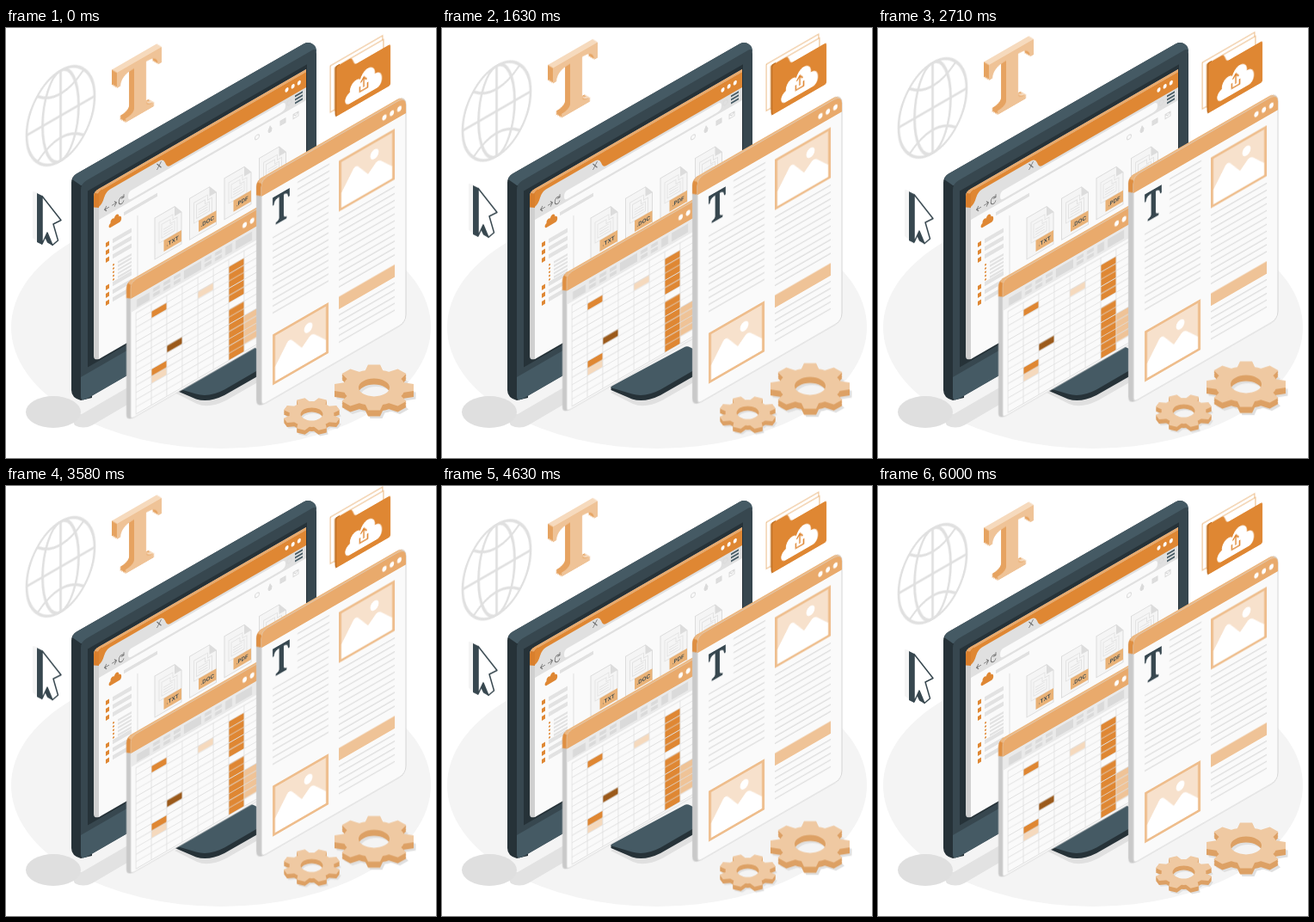
These frames come from a looping animation (500x500 px, 6040 ms). An HTML page without scripts:

```html
<!DOCTYPE html>
<html lang="en">
<head>
<meta charset="utf-8">
<title>Digital documents</title>
<style>
html, body { margin: 0; width: 100%; height: 100%; overflow: hidden; background: #fff; }
svg { display: block; width: 100vw; height: 100vh; }
.slow, .mid, .fast { animation: slow 6.04s linear infinite; }
.mid { animation-name: mid; }
.fast { animation-name: fast; }
@keyframes slow {
  0%, 99.34%, 100% { transform: translateY(0); }
  49.67% { transform: translateY(-10px); }
}
@keyframes mid {
  0%, 49.67%, 99.34%, 100% { transform: translateY(0); }
  24.83%, 74.5% { transform: translateY(-10px); }
}
@keyframes fast {
  0%, 24.83%, 49.67%, 74.5%, 99.34%, 100% { transform: translateY(0); }
  12.42%, 37.25%, 62.09%, 86.92% { transform: translateY(-10px); }
}
.line { fill: none; stroke: #e0e0e0; }
.text { fill: none; stroke: #dedede; stroke-width: 65; stroke-dasharray: 1.5 6.45; }
.tag { font: 600 6.2px Inter, Roboto, sans-serif; fill: #37474f; }
.main { fill: #df8733; }
.soft { fill: #e9aa6c; }
.pale { fill: #efc397; }
.white { fill: #fff; }
</style>
</head>
<body>
<svg viewBox="0 0 500 500" xmlns="http://www.w3.org/2000/svg">
<defs>
  <path id="tee" d="M0 0H52V18H48C47 9 43 6.500 34 6.500V53C34 57 37 59 43 59V64H10V59C16 59 20 57 20 53V6.500C10 6.500 5 9 4 18H0Z"/>
  <path id="tooth" d="M-10.500 -33L-7 -46H7L10.500 -33Z"/>
  <g id="four"><use href="#tooth"/><use href="#tooth" transform="rotate(90)"/><use href="#tooth" transform="rotate(180)"/><use href="#tooth" transform="rotate(270)"/></g>
  <g id="wheel">
    <path fill-rule="evenodd" d="M-36 0A36 36 0 0 1 36 0A36 36 0 0 1 -36 0M-18 0A18 18 0 0 0 18 0A18 18 0 0 0 -18 0"/>
    <use href="#four"/><use href="#four" transform="rotate(45)"/>
  </g>
  <g id="flat" transform="scale(1 .577)"><use href="#wheel"/></g>
  <g id="turned" transform="scale(1 .577) rotate(22.500)"><use href="#wheel"/></g>
  <g id="page">
    <path d="M0 0H23L31 11V48H0Z" fill="#f5f5f5" stroke="#dcdcdc"/>
    <path d="M23 0V11H31Z" fill="#dcdcdc"/>
    <path class="line" stroke-width=".8" d="M5 8H21V14H26V32H5ZM8 12H18V17H23V28H8ZM10 19H21M10 22H21M10 25H21"/>
  </g>
  <path id="tagbox" d="M10.500 32H31V45H10.500Z" fill="#e9b277"/>
  <g id="photo">
    <path d="M0 0H65V59H0Z" fill="#eebd8c"/>
    <path d="M3 3H62V56H3Z" fill="#f7e1cc"/>
    <path class="white" d="M3 56V39L17 19Q20 16 23 20L34 35L43 27Q46 25 49 28L62 42V56Z"/>
    <ellipse class="white" cx="41.500" cy="16" rx="4.800" ry="5.600"/>
  </g>
  <path id="cloud" d="M-16 15C-23 15-24 4-16 2C-17-7-8-11-4-6C0-19 14-15 13-3C23-4 24 15 15 15Z"/>
  <g id="dots" class="white"><ellipse rx="2.500" ry="3.100"/><ellipse cx="8.700" rx="2.500" ry="3.100"/><ellipse cx="17.400" rx="2.500" ry="3.100"/></g>
</defs>

<!-- floor and shadows -->
<ellipse cx="250" cy="348" rx="244" ry="141" fill="#f4f4f4"/>
<path d="M72 446L88 449L300 326V345L100 462Q90 467 80 462Z" fill="#e2e2e2"/>
<ellipse cx="55" cy="446.500" rx="32" ry="18.500" fill="#dfdfdf"/>
<path d="M196 424L222 437Q236 443 256 433L310 402V380Z" fill="#e0e0e0"/>

<!-- monitor stand -->
<path d="M196.500 417V421L221 431.500Q236 436 254 427L310 395V383Z" fill="#263238"/>
<path d="M198 416L282 371Q285 369.500 289 371.500L310 383V388L254 420.500Q236 430 221 425.500L199 419Q195 418 198 416Z" fill="#455a64"/>

<!-- monitor -->
<path d="M76 180Q76 173 82 169.500L346 18.500Q352 15.500 357 19L361 26L100 190V430L87 433Q76 430 76 421Z" fill="#263238"/>
<path d="M77 176Q78 172 82 169.500L346 18.500Q352 15.500 357 19Q361 21 361 27L350 40L100 185L87 183Z" fill="#455a64"/>
<g transform="matrix(1 -.577 0 1 87 182)">
  <path d="M0 6Q0 -1 7 -1H267Q274 -2 274 6V246Q274 253 266 253H8Q0 253 0 246Z" fill="#37474f"/>
  <path d="M0 224H274V246Q274 253 266 253H8Q0 253 0 246Z" fill="#455a64"/>
  <path d="M8 12H263V217H8Z" fill="#263238"/>
</g>

<!-- browser -->
<g transform="matrix(1 -.577 0 1 108 193)">
  <path d="M-6 -2Q-6 -6 0 -6H241V0L0 192Q-6 190 -6 185Z" fill="#d0d0d0"/>
  <path d="M0 -3H241V192H0Z" fill="#fafafa"/>
  <path d="M-6 -1Q-6 -6 0 -6H4V16H0L-6 12Z" fill="#d97f2c"/>
  <path class="soft" d="M-5 -4Q-4 -6 0 -6H241V-3H3Q0 -3 -1 -1Z"/>
  <path class="main" d="M0 0Q0 -3 3 -3H241V16H0Z"/>
  <path d="M0 15Q4 14 6 8Q8 2 13 2H70Q75 2 77 8Q79 15 83 15H241V30H0Z" fill="#e0e0e0"/>
  <path d="M38 17.500H212Q217 17.500 217 22.500T212 27.500H38Q34 27.500 34 22.500T38 17.500Z" fill="#fafafa"/>
  <path d="M67.500 4L72.500 11M72.500 4L67.500 11M6.500 22H12M9 19L6.500 22L9 25M15 22H20.500M18 19L20.500 22L18 25M28.500 20A3 4 0 1 0 29 24M29 17V20.500H26" fill="none" stroke="#707070" stroke-width=".9"/>
  <use href="#dots" transform="translate(218.500 5) scale(.82)"/>
  <path d="M228 18H237M228 22H237M228 26H237" stroke="#455a64" stroke-width="2"/>
  <g fill="none" stroke="#dadada">
    <circle cx="221.500" cy="21.500" r="2.700"/>
    <circle cx="184" cy="40" r="2.500"/>
    <path d="M199 36L201 40Q201 43 199 43T197 40Z" fill="#dadada"/>
    <path d="M211 37H217V42H211Z" fill="#dedede"/>
    <path d="M226 38H232V43H226ZM226 38L229 41L232 38"/>
  </g>
  <use href="#cloud" class="main" transform="translate(19 41) scale(.34 .38)"/>
  <path class="line" stroke-width="4" d="M29 40H68"/>
  <path class="line" d="M45 51V190"/>
  <g fill="none" stroke="#df8733">
    <path d="M10 61.500V85M10 111.500V135" stroke-width="4" stroke-dasharray="5 4"/>
    <path d="M17 91V111" stroke-width="1.800" stroke-dasharray="2 2.300"/>
  </g>
  <g fill="none" stroke="#e2e2e2">
    <path d="M27 61.500V85M27 111.500V135" stroke-width="22" stroke-dasharray="5 4"/>
    <path d="M30 91V111" stroke-width="16" stroke-dasharray="2.400 1.900"/>
  </g>
  <use href="#page" x="65" y="65.500"/><use href="#tagbox" x="65" y="65.500"/>
  <use href="#page" x="105.500" y="66"/><use href="#tagbox" x="105.500" y="66"/>
  <use href="#page" x="146" y="66"/><use href="#tagbox" x="146" y="66"/>
  <use href="#page" x="186.500" y="66"/>
  <g class="tag" text-anchor="middle"><text x="85.700" y="106.300">.TXT</text><text x="126.200" y="106.800">.DOC</text><text x="166.700" y="106.800">.PDF</text></g>
</g>

<!-- spreadsheet -->
<g class="mid"><g transform="matrix(1 -.577 0 1 145 296)">
  <path d="M-5 4Q-5 -3 2 -3H165V0L2 159Q-5 157 -5 151Z" fill="#c9c9c9"/>
  <path d="M-5 4Q-5 -3 2 -3H165V3H2V20L-5 15Z" fill="#df8f42"/>
  <path d="M-3 -1Q-1 -3 2 -3H165V1H6Q2 1 1 4Z" fill="#edb881"/>
  <path d="M0 7Q0 0 6 0H165V159H4Q0 159 0 155Z" fill="#fafafa" stroke="#d6d6d6" stroke-width=".8"/>
  <path class="soft" d="M0 7Q0 0 6 0H165V19H0Z"/>
  <use href="#dots" x="132.500" y="9.500"/>
  <path d="M0 19H165V35H0Z" fill="#eaeaea"/>
  <path d="M7 24H22V33H7ZM26 22H34V26H26ZM26 28H34V32H26ZM38 22H46V26H38ZM38 28H46V32H38ZM50 22H58V26H50ZM50 28H58V32H50ZM62 22H82V32H62ZM86 22H94V26H86ZM86 28H94V32H86ZM98 22H106V26H98ZM98 28H106V32H98ZM110 22H118V32H110ZM122 22H141V32H122Z" fill="#dadada"/>
  <path class="main" d="M24 46.900H42V55.300H24ZM24 114.500H42V123H24ZM114 46.900H132V88.900H114ZM114 97.300H132V156H114Z"/>
  <path class="pale" d="M132 114H165V147.700H132Z"/>
  <path d="M78 55.300H96V63.700H78ZM24 123H42V131H24Z" fill="#f5d9bd"/>
  <path d="M42 97.300H60V105.700H42Z" fill="#9b5a1b"/>
  <path class="line" stroke-width="160" stroke-dasharray=".9 7.500" d="M86 38.500V157"/>
  <path class="line" stroke-width="118" stroke-dasharray=".8 17.200" d="M5.600 97.500H165"/>
</g></g>

<!-- document -->
<g class="fast"><g transform="matrix(1 -.577 0 1 297 177)">
  <path d="M-6 4Q-6 -3 2 -3H157Q164 -3 167 3L2 262Q-6 260 -6 252Z" fill="#c9c9c9"/>
  <path d="M-6 4Q-6 -3 2 -3H157L160 3H2V20L-6 14Z" fill="#df8f42"/>
  <path d="M-4 0Q-2 -3 2 -3H157Q164 -3 167 5L158 1H7Q2 1 1 5Z" fill="#edb881"/>
  <path d="M0 8Q0 0 7 0H159Q168 0 168 9V253Q168 262 160 262H5Q0 262 0 257Z" fill="#fafafa" stroke="#d6d6d6"/>
  <path class="soft" d="M0 8Q0 0 7 0H159Q168 0 168 9V19H0Z"/>
  <use href="#dots" x="143" y="9.500"/>
  <use href="#tee" transform="translate(13 28) scale(.38 .52)" fill="#37474f"/>
  <path class="text" style="stroke-width:37px" d="M60.500 26V68"/>
  <path class="text" d="M45.500 73.700V163M122.500 96V178M122.500 208V243"/>
  <path class="pale" d="M90 187.500H155V202H90Z"/>
  <use href="#photo" x="90" y="29.500"/>
  <use href="#photo" x="13" y="187"/>
</g></g>

<!-- globe -->
<g class="slow"><g transform="matrix(1 -.577 0 1 63.500 102)" class="line" stroke-width="2.800">
  <ellipse rx="39.500" ry="52.500"/>
  <ellipse rx="21" ry="52.500"/>
  <path d="M0 -52.500V52.500M-39 0H39M-27 -38Q0 -13 27 -38M-27 38Q0 13 27 38"/>
</g></g>

<!-- letter -->
<g class="slow"><g transform="matrix(1 -.577 0 1 129 52)">
  <g fill="#e6a361"><use href="#tee" x="-6" y="-7"/><use href="#tee" x="-4.500" y="-5.200"/><use href="#tee" x="-3" y="-3.500"/><use href="#tee" x="-1.500" y="-1.700"/></g>
  <path d="M-6 -7H46L52 0H0Z" fill="#f6dabd"/>
  <path d="M34 53Q35 58 43 59L39 55Q35 55 34 51Z" fill="#f6dabd"/>
  <use href="#tee" class="pale"/>
</g></g>

<!-- folder -->
<g class="fast"><g transform="matrix(1 -.577 0 1 384 45)">
  <path d="M-7 -5H54V49H-7Z" fill="#fff" stroke="#e9b277" stroke-width=".9"/>
  <path d="M-2 0H55V50H-2Z" fill="#fff" stroke="#e9b277" stroke-width=".9"/>
  <path d="M-1.500 2Q-1.500 -1 1 -1H4V58H0Q-1.500 57 -1.500 54Z" fill="#b96a1f"/>
  <path class="main" d="M0 3Q0 0 3 0H16Q18 0 19 3L21 8Q22 10 24 10H61Q63 10 63 12V56Q63 58 61 58H2Q0 58 0 56Z"/>
  <use href="#cloud" class="white" transform="translate(32 37)"/>
  <path d="M32 42V31M28.500 35L32 30.500L35.500 35M27.500 39V45H36.500V39" fill="none" stroke="#df8733" stroke-width="1.500"/>
</g></g>

<!-- pointer -->
<g class="mid">
  <path d="M31 190L36 191V248L31 244Z" fill="#f4f4f4"/>
  <path d="M36 192L42 195V252L36 249ZM48 238L54 253L48 249.500L45 243Z" fill="#37474f"/>
  <path d="M42 195.500L64 223.500L55 228L60.500 247L54 252.500L48 238L42 251Z" fill="#fff" stroke="#37474f" stroke-width="1.500" stroke-linejoin="round"/>
</g>

<!-- gears -->
<g class="fast">
  <g transform="translate(428 418)">
    <use href="#flat" x="2.500" y="9.500" fill="#e0e0e0"/>
    <g fill="#dda165"><use href="#flat" y="7"/><use href="#flat" y="5.500"/><use href="#flat" y="4"/><use href="#flat" y="2.500"/><use href="#flat" y="1"/></g>
    <use href="#flat" fill="#efc9a2"/>
  </g>
  <g transform="translate(355.500 449) scale(.72)">
    <use href="#turned" x="2.500" y="9.500" fill="#e0e0e0"/>
    <g fill="#dda165"><use href="#turned" y="7"/><use href="#turned" y="5.500"/><use href="#turned" y="4"/><use href="#turned" y="2.500"/><use href="#turned" y="1"/></g>
    <use href="#turned" fill="#efc9a2"/>
  </g>
</g>
</svg>
</body>
</html>
```
